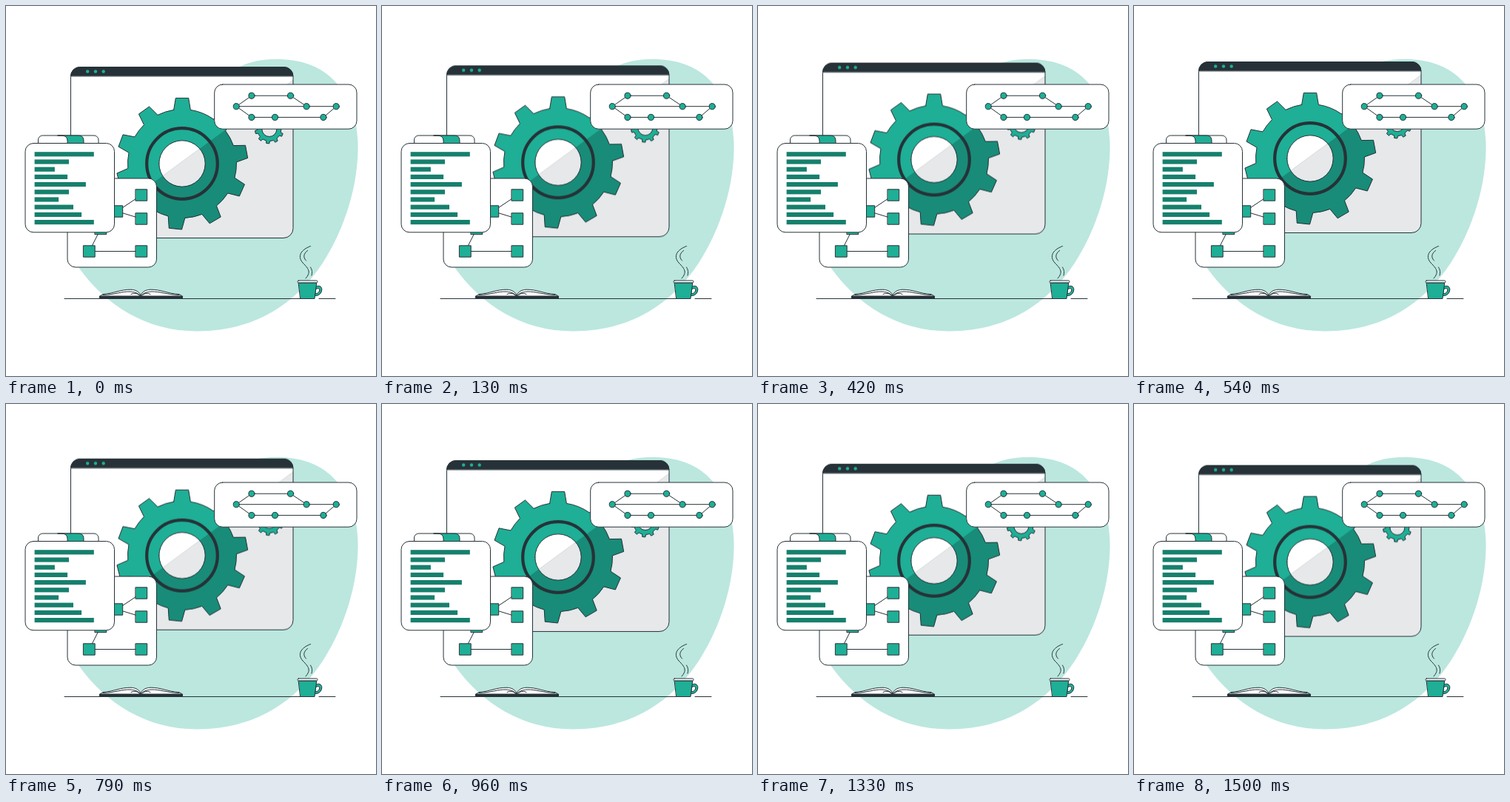
These frames come from a looping animation (500x500 px, 1.54 s). An HTML page:

```html
<!DOCTYPE html>
<html lang="en">
<head>
<meta charset="utf-8">
<title>Workflow</title>
<style>
  html, body { margin: 0; width: 100%; height: 100%; overflow: hidden; background: #fff; }
  svg { display: block; width: 100vw; height: 100vh; }
  .ink { stroke: #263238; stroke-width: 1; stroke-linejoin: round; stroke-linecap: round; }
  .white { fill: #fff; }
  .green { fill: #1eaf96; }
  .shade { fill: #188c78; }
  .dark { fill: #263238; }
  .none { fill: none; }
</style>
</head>
<body>
<svg viewBox="0 0 500 500">
  <defs>
    <clipPath id="half"><path d="M388 100V313.5H97.5Z"/></clipPath>
  </defs>

  <path fill="#bbe7df" d="M316 82C336 72 362 69.500 388 73.500C418 78 437 92 449 107
    C466 128 474 150 475.500 185C477 240 458 300 430 344C398 394 345 439.500 258 439.500
    C190 439.500 135 405 98 353L110 300L200 200Z"/>

  <g id="window">
    <rect class="white" x="87.500" y="82.500" width="300.500" height="231" rx="13"/>
    <path fill="#e6e8ea" stroke="#c9cccd" stroke-width=".6" d="M388 100V300.500a13 13 0 0 1-13 13H97.500Z"/>
    <rect class="ink none" x="87.500" y="82.500" width="300.500" height="231" rx="13"/>
    <path class="ink dark" d="M87.500 94.500a12 12 0 0 1 12-12H376a12 12 0 0 1 12 12Z"/>
    <g class="green">
      <circle cx="110.200" cy="88.500" r="2.200"/>
      <circle cx="121" cy="88.500" r="2.200"/>
      <circle cx="131.700" cy="88.500" r="2.200"/>
    </g>
    <path id="cog" class="green" fill-rule="evenodd"/>
    <path id="cogShade" class="shade" fill-rule="evenodd" clip-path="url(#half)"/>
    <path id="cogLine" class="ink none"/>
    <circle cx="238" cy="213" r="47.800" fill="none" stroke="#263238" stroke-width="4.200"/>
    <path id="smallCog" class="ink green" fill-rule="evenodd"/>
  </g>

  <g id="tree">
    <rect class="ink white" x="83" y="233" width="120.500" height="120" rx="11"/>
    <path class="ink none" d="M183 255.500L150 277.500L183 287.500M150 277.500L128 301L112.500 331.500H183"/>
  </g>

  <g id="list">
    <path class="ink white" d="M43.500 187V181a6 6 0 0 1 6-6H119a6 6 0 0 1 6 6V187Z"/>
    <path class="ink green" d="M70 175H98q7 0 7 7V187H83V182q0-7-8-7Z"/>
    <rect class="ink white" x="26" y="185.500" width="120.500" height="120.300" rx="11"/>
  </g>

  <g id="graph">
    <rect class="ink white" x="281.700" y="106" width="192.300" height="60.200" rx="11"/>
    <path class="ink none" d="M446.300 135.700H311.300L332 121.200H384.600L406.200 135.700M311.300 135.700L332 150.400H429L446.300 135.700"/>
  </g>

  <path class="ink none" d="M79 395.500H398M423 395.500H445"/>

  <g id="book">
    <path class="ink white" d="M127 392L131 389.500C146 388.500 154 383 169 383.200C176 383.500 181 387 182 391.500
      C183 387 188 383.500 195 383.200C210 383 219 389 234 389.500L238 392Z"/>
    <path class="ink none" d="M131 390.500C148 390 156 385.500 168 386C175 386.500 180 389 182 392
      C184 389 189 386.500 196 386C208 385.500 217 390 234 390.500
      M169 389.500C174 387 178 388.500 180.500 391.500M184 391.500C186 388.500 190 387 195 389.500"/>
    <rect class="dark" x="126" y="391.800" width="113" height="3.900" rx=".8"/>
  </g>

  <g id="cup">
    <path class="ink green" d="M419 379C424 376.500 428 380 426.500 385C425.500 390 421 392 417 391.500Z"/>
    <path class="ink white" d="M419 382.500C422 380.500 424.500 382 423.500 385C422.500 388 420.500 388.800 418 388.500Z"/>
    <path class="ink green" d="M395.500 374H419.800L417 395.500H398Z"/>
    <rect class="ink white" x="394" y="371" width="27" height="2.900" rx="1.400"/>
    <path class="ink none" d="M411.500 324.500C397 330 394 339 401 347C410 356 412 360 405 368
      M407.500 330.500C401.500 335 401.500 340 405.500 344M411.500 353C414 357 414 360 413 364"/>
  </g>
</svg>
<script>
const NS = 'http://www.w3.org/2000/svg';
const byId = id => document.getElementById(id);

function add(parent, tag, attrs) {
  const el = document.createElementNS(NS, tag);
  for (const key in attrs) el.setAttribute(key, attrs[key]);
  byId(parent).append(el);
}

// Outline of a cog with a round hole; angles are tooth centres in degrees.
function cogPath(cx, cy, root, tip, hole, angles, rootHalf, tipHalf) {
  const at = (r, deg) => {
    const a = deg * Math.PI / 180;
    return (cx + r * Math.cos(a)).toFixed(2) + ' ' + (cy + r * Math.sin(a)).toFixed(2);
  };
  const teeth = angles.map((a, i) =>
    (i ? `A${root} ${root} 0 0 1 ` : 'M') + at(root, a - rootHalf) +
    'L' + at(tip, a - tipHalf) + 'L' + at(tip, a + tipHalf) + 'L' + at(root, a + rootHalf));
  return teeth.join('') + `A${root} ${root} 0 0 1 ${at(root, angles[0] - rootHalf)}Z` +
    `M${cx - hole} ${cy}a${hole} ${hole} 0 1 0 ${2 * hole} 0a${hole} ${hole} 0 1 0 ${-2 * hole} 0Z`;
}

const bigAngles = [-90, -46, -10.5, 24, 59.7, 95.9, 131, 166, 200.5, 234.4];
const big = cogPath(238, 213, 73.5, 89, 31.2, bigAngles, 8.9, 5.6);
for (const id of ['cog', 'cogShade', 'cogLine']) byId(id).setAttribute('d', big);

const smallAngles = Array.from({ length: 10 }, (_, i) => i * 36 - 90 + 6);
byId('smallCog').setAttribute('d', cogPath(355.8, 166.5, 16, 19.4, 10, smallAngles, 9, 6));

for (const [x, y] of [[183, 255.5], [183, 287.5], [150, 277.5], [128, 301], [112.5, 331.5], [183, 331.5]])
  add('tree', 'rect', { class: 'ink green', x: x - 7.7, y: y - 7.7, width: 15.4, height: 15.4 });
byId('tree').after(byId('list'));

[80.2, 46.4, 27.3, 44.5, 69.3, 46.4, 32.5, 52.4, 63.5, 80.2].forEach((width, i) =>
  add('list', 'rect', { fill: '#16806d', x: 38.6, y: 197.2 + i * 10.2, width, height: 6.2 }));

for (const [cx, cy] of [[332, 121.2], [384.6, 121.2], [311.3, 135.7], [406.2, 135.7],
  [446.3, 135.7], [332, 150.4], [363.6, 150.4], [429, 150.4]])
  add('graph', 'circle', { class: 'ink green', cx, cy, r: 4.1 });

// The window floats up and down at constant speed.
const LOOP = 1540;
const steps = [[0, 0], [715, -9.3], [1485, 0.7], [LOOP, 0]];
byId('window').animate(
  steps.map(([ms, y]) => ({ offset: ms / LOOP, transform: `translateY(${y}px)` })),
  { duration: LOOP, iterations: Infinity, easing: 'linear' });
</script>
</body>
</html>
```
